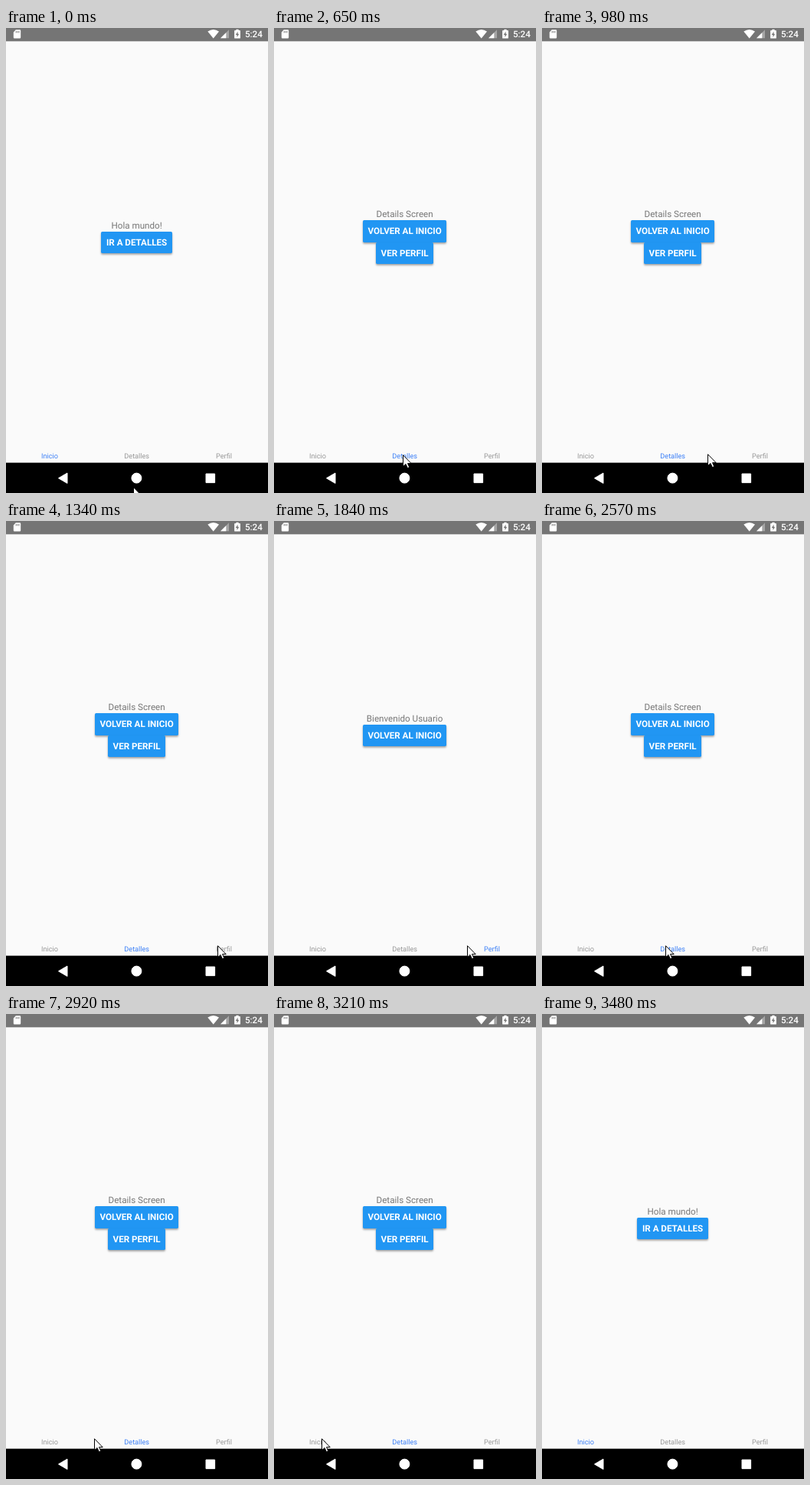
Write an HTML page that moves like this. It is 342x605 px and loops after 4130 ms.

```html
<!DOCTYPE html>
<html lang="es">
<head>
<meta charset="utf-8">
<title>Navegación por pestañas</title>
<style>
  html, body { margin: 0; width: 100%; height: 100%; overflow: hidden; background: #fafafa; }
  body { position: relative; font: 11.65px Roboto, sans-serif; text-rendering: geometricPrecision; }
  svg { position: absolute; left: 0; top: 0; width: 342px; height: 605px; }
  .screen {
    position: absolute; left: 0; top: 0; width: 341.2px; height: 541.8px;
    display: flex; flex-direction: column; align-items: center; justify-content: center;
  }
  .title { line-height: 16px; color: #777; }
  .btn {
    padding: 0 6.65px; line-height: 28.5px; font-weight: 700; color: #fff;
    background: #2196f3; border-radius: 1.7px; box-shadow: 0 1.7px 2.5px rgba(0, 0, 0, .36);
  }
  #tabs { position: absolute; left: 0; top: 552px; width: 341.4px; display: flex; }
  .tab { flex: 1 1 0; text-align: center; font-size: 9.15px; line-height: 13px; color: #989898; }
  .tab.on { color: #3d80f7; }
  .clock { font-weight: 500; text-anchor: middle; }
</style>
</head>
<body>
<div id="screens"></div>
<div id="tabs"></div>
<svg viewBox="0 0 342 605">
  <rect width="342" height="17.3" fill="#757575"/>
  <g fill="#fff">
    <path d="M12.8 2.3H18a1.2 1.2 0 0 1 1.2 1.2V12.3A1.2 1.2 0 0 1 18 13.5H11A1.2 1.2 0 0 1 9.8 12.3V5.5Z"/>
    <path d="M13.2 4v2.3M15.1 4v2.3M17 4v2.3" stroke="#757575" stroke-width=".9"/>
    <path d="M263.3 4.6Q270.7 -.4 278 4.6L270.7 13.4Z"/>
    <path d="M280 13.3L291 2.3V13.3Z" opacity=".35"/>
    <path d="M280 13.3L287.3 6V13.3Z"/>
    <path d="M300.4 2.9V1.8h3.2v1.1h1.4a.9.9 0 0 1 .9.9v8.9a.9.9 0 0 1-.9.9h-6a.9.9 0 0 1-.9-.9V3.8a.9.9 0 0 1 .9-.9Z"/>
    <path d="M302.5 4.6L299.8 8.9H301.5V12L304.2 7.7H302.5Z" fill="#757575"/>
    <text class="clock" x="323.4" y="12.2">5:24</text>
  </g>
  <rect y="565.6" width="342" height="40"/>
  <g fill="#fff" stroke="#fff" stroke-linejoin="round">
    <path d="M68.5 585.7L80 579V592.4Z"/>
    <circle cx="170.4" cy="585.6" r="6.5"/>
    <rect x="261" y="580" width="11.6" height="11.6"/>
  </g>
  <path id="cursor" d="M.5 .7V15.6L4 12.4L6.4 17.6L8.8 16.6L6.5 11.6H11.2Z" fill="#fff" stroke="#000"/>
</svg>
<script>
const LOOP = 4130;
const STEP = 28;

const screens = [
  { tab: 'Inicio', title: 'Hola mundo!', buttons: ['IR A DETALLES'] },
  { tab: 'Detalles', title: 'Details Screen', buttons: ['VOLVER AL INICIO', 'VER PERFIL'] },
  { tab: 'Perfil', title: 'Bienvenido Usuario', buttons: ['VOLVER AL INICIO'] }
];

// A tap on a tab opens its screen.
const taps = [
  { at: 0, tab: 0 }, { at: 620, tab: 1 }, { at: 1620, tab: 2 }, { at: 2470, tab: 1 }, { at: 3330, tab: 0 }
];

// Strokes of the pointer tip; it rests where the last one ended.
const strokes = [
  { start: 0, end: 220, from: [166, 597], to: [163, 557] },
  { start: 592, end: 650, from: [163, 557], to: [168, 555] },
  { start: 650, end: 1340, from: [168, 555], to: [276, 552] },
  { start: 1592, end: 1840, from: [276, 552], to: [252, 552] },
  { start: 1840, end: 2920, from: [252, 552], to: [115, 552] },
  { start: 2920, end: 3210, from: [115, 552], to: [62, 552] },
  { start: 3300, end: 3480, from: [62, 552], to: [70, 606] }
];

const byId = id => document.getElementById(id);
const div = (name, content) => `<div class="${name}">${content}</div>`;

byId('screens').innerHTML = screens.map(s =>
  div('screen', div('title', s.title) + s.buttons.map(b => div('btn', b)).join(''))).join('');
byId('tabs').innerHTML = screens.map(s => div('tab', s.tab)).join('');

const screenEls = [...byId('screens').children];
const tabEls = [...byId('tabs').children];
const cursor = byId('cursor');

const latest = (list, key, t) => list.filter(item => item[key] <= t).pop();

// Each stroke advances in short, even holds.
function pointerAt(t) {
  const { start, end, from, to } = latest(strokes, 'start', t);
  const steps = Math.round((end - start) / STEP);
  const done = Math.min(1, Math.floor((t - start) / (end - start) * steps) / steps);
  return from.map((v, i) => Math.round(v + (to[i] - v) * done));
}

function draw(t) {
  const current = latest(taps, 'at', t).tab;
  screenEls.forEach((el, i) => el.style.display = i === current ? '' : 'none');
  tabEls.forEach((el, i) => el.classList.toggle('on', i === current));
  cursor.setAttribute('transform', `translate(${pointerAt(t)})`);
}

const begin = performance.now();
function tick() {
  draw((performance.now() - begin) % LOOP);
  requestAnimationFrame(tick);
}
tick();
</script>
</body>
</html>
```
